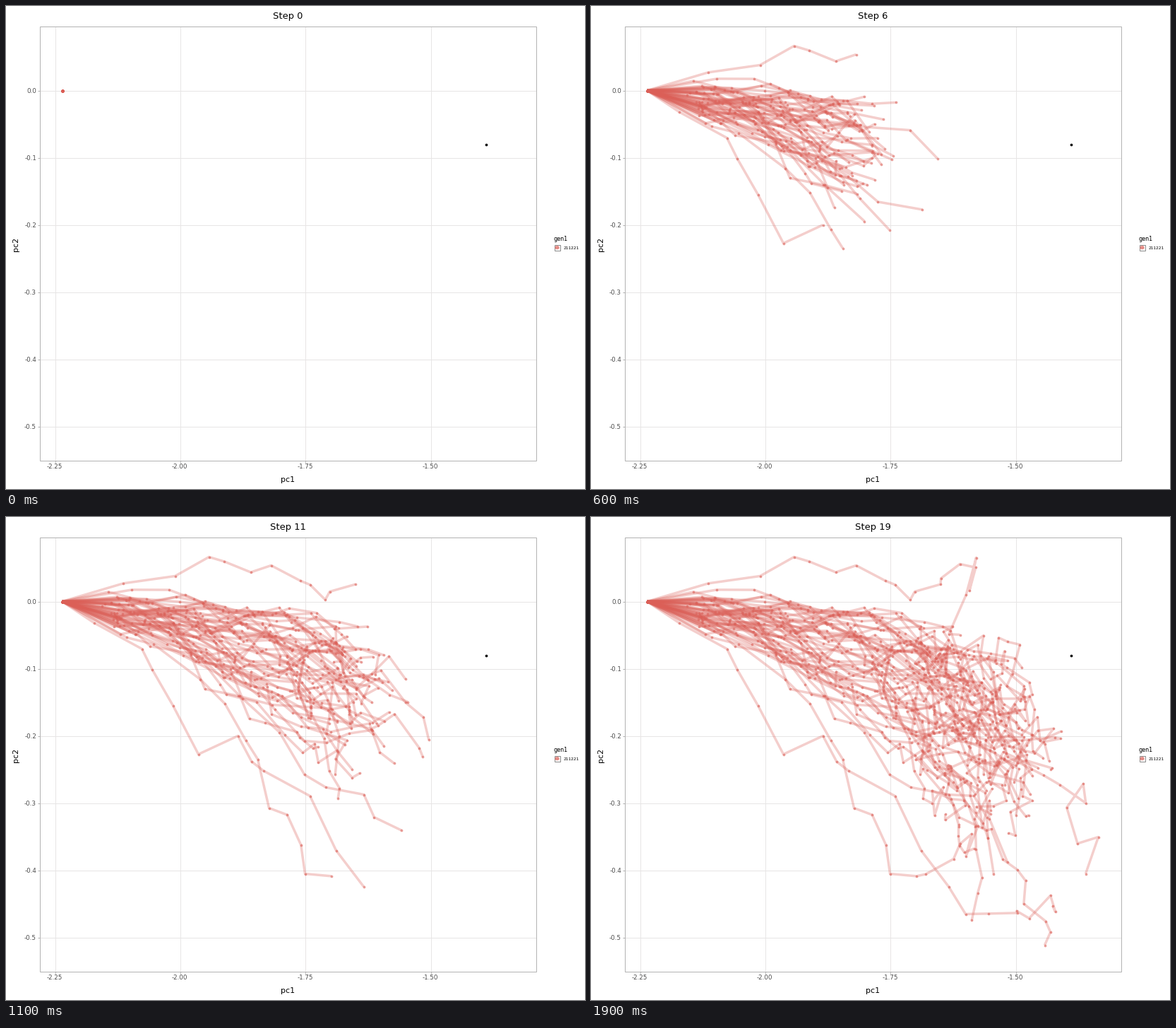
A matplotlib script that plays this animation: 820x683 px, repeating every 2000 ms.

```python
import numpy as np
import matplotlib.pyplot as plt
from matplotlib.animation import FuncAnimation
from matplotlib.collections import LineCollection
from matplotlib.colors import to_rgba
from matplotlib.patches import Circle, Rectangle

W, H, DPI = 820, 683, 64
STEPS, WALKS = 20, 52
RED, GREY, INK, GRID = "#DB5F57", "#B3B3B3", "#4D4D4D", "#E7E5E5"
START, GOAL = np.array([79.5, 119.5]), (680.3, 196.2)

# Key points (step, x, y) of the walks that leave the cloud.
STRAYS = [
    [(2, 239, 83), (3, 287, 56), (6, 375, 68), (10, 458, 105),
     (13, 522, 66), (16, 545, 57), (19, 522, 166)],
    [(2, 192, 186), (5, 272, 335), (6, 328, 309), (10, 467, 471),
     (12, 530, 561), (16, 620, 567)],
    [(6, 356, 342), (7, 372, 411), (10, 423, 504), (13, 513, 483)],
    [(6, 422, 316)],
    [(6, 490, 215)],
    [(18, 718, 452), (19, 700, 504)],
    [(19, 642, 605)],
]

rng = np.random.default_rng(8)
steps = np.arange(STEPS)
# The cloud slows down to the right while sinking steadily.
drift = START + np.column_stack(
    [600 * (1 - np.exp(-0.15 * steps ** 0.87)), 12.4 * steps])


def free_walk():
    """Noise around the drift, kept inside a widening band."""
    path, dev = drift.copy(), np.zeros(2)
    for n in range(1, STEPS):
        kick = np.clip(rng.normal(size=2), -2.2, 2.2)
        dev = dev * (0.9, 0.99) + kick * (12 + 0.4 * n, 15 + 0.4 * n)
        dev = np.clip(dev, (-25 - 4 * n, -35 - 6 * n), (25 + 4 * n, 40 + 10 * n))
        path[n] += dev
    return path


def stray_walk(keys):
    """A free walk bent through its key points."""
    path = free_walk()
    at, *points = np.array(keys).T
    for axis, goal in enumerate(points):
        gap = goal + 0.5 - path[at, axis]
        path[:, axis] += np.interp(steps, [0, *at, 25], [0, *gap, 0])
    return np.clip(path, (79, 56), (719, 606))


paths = np.array([stray_walk(k) for k in STRAYS]
                 + [free_walk() for _ in range(WALKS - len(STRAYS))])


def pt(px):
    return px * 72 / DPI


fig = plt.figure(figsize=(W / DPI, H / DPI), dpi=DPI, facecolor="white")
ax = fig.add_axes([0, 0, 1, 1])
ax.set(xlim=(0, W), ylim=(H, 0))
ax.axis("off")


def line(xs, ys, color, width=1):
    ax.plot(xs, ys, color=color, lw=pt(width), zorder=1, solid_capstyle="butt")


def label(x, y, text, size, color="black", ha="center", va="baseline", **kw):
    return ax.text(x, y, text, fontsize=pt(size), color=color, ha=ha, va=va,
                   family="DejaVu Sans", **kw)


# Panel, grid and axis labels
LEFT, RIGHT, TOP, BOTTOM = 47.7, 750.5, 28.5, 642.6
for i in range(4):
    x = 69.6 + 177.3 * i
    line([x, x], [TOP, BOTTOM], GRID)
    line([x, x], [BOTTOM, BOTTOM + 3], GREY)
    label(x - 0.6, 654.3, f"{-2.25 + 0.25 * i:.2f}", 8.8, INK)
for i in range(6):
    y = 119.5 + 95 * i
    line([LEFT, RIGHT], [y, y], GRID)
    line([LEFT - 3, LEFT], [y, y], GREY)
    label(43, y + 3.5, f"{0 - i / 10:.1f}", 8.8, INK, "right")
ax.add_patch(Rectangle((LEFT, TOP), RIGHT - LEFT, BOTTOM - TOP, fill=False,
                       ec=GREY, lw=pt(1), zorder=6))
title = label(399, 18.3, "", 13)
label(399, 673, "pc1", 11)
label(13.5, 337, "pc2", 11, rotation=90, va="center")

# Legend
label(776, 332, "gen1", 8, ha="left")
label(789.3, 343.6, "211221", 5.9, ha="left")
ax.add_patch(Rectangle((776.5, 337.5), 8, 8, fill=False, ec="#8C8C8C", lw=pt(1)))
line([777, 784], [341.5, 341.5], to_rgba(RED, 0.3), 3.5)
ax.add_patch(Circle((780.5, 341.5), 2.8, fc=RED, ec="none", alpha=0.6, zorder=3))

# Walks
trails = LineCollection([], colors=RED, alpha=0.3, linewidths=pt(3.5),
                        capstyle="butt", joinstyle="round", zorder=3)
ax.add_collection(trails)
dots = ax.scatter([], [], s=pt(3.7) ** 2, c=RED, alpha=0.6, linewidths=0, zorder=4)
ax.scatter(*GOAL, s=pt(3.7) ** 2, c="black", linewidths=0, zorder=5)


def update(n):
    seen = paths[:, :n + 1]
    trails.set_segments(list(seen) if n else [])
    dots.set_offsets(seen.reshape(-1, 2))
    title.set_text(f"Step {n}")
    return trails, dots, title


anim = FuncAnimation(fig, update, frames=STEPS, interval=100, repeat=True,
                     repeat_delay=0, init_func=lambda: update(0))
plt.show()
```
